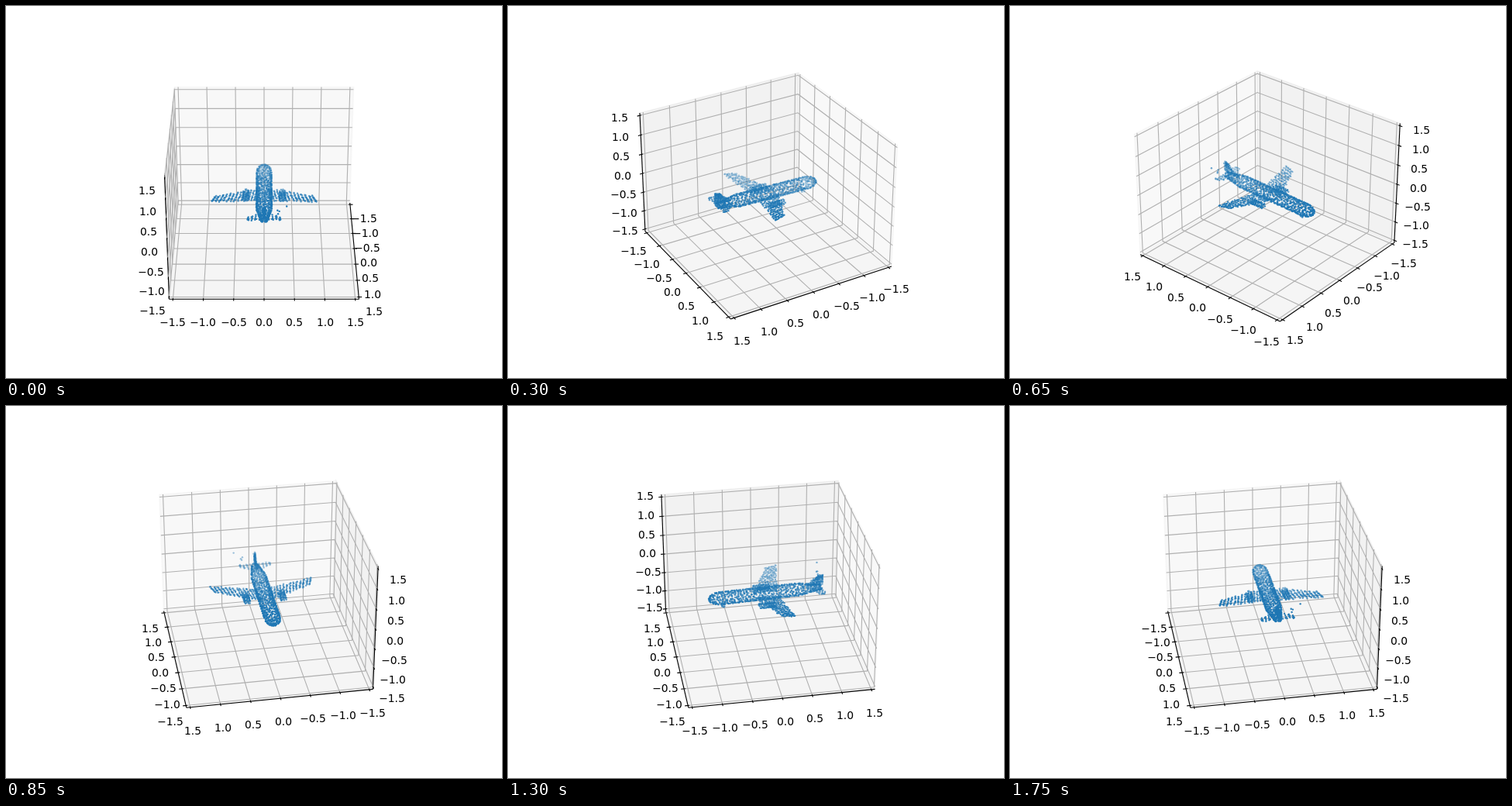
Write an HTML page with a canvas that moves like this. It is 640 by 480 pixels and loops after 1.8 s.

```html
<!DOCTYPE html>
<html>
<head>
<meta charset="utf-8">
<style>
html, body { margin: 0; width: 100%; height: 100%; overflow: hidden; background: #fff; }
canvas { display: block; }
</style>
</head>
<body>
<canvas id="stage" width="640" height="480"></canvas>
<script>
const ctx = document.getElementById('stage').getContext('2d');
const EDGE = 1.5625, LABEL_GAP = 0.2593;
const TICKS = [-1.5, -1, -0.5, 0, 0.5, 1, 1.5];
const PANES = ['rgba(242,242,242,.5)', 'rgba(230,230,230,.5)', 'rgba(236,236,236,.5)'];
const TICK_DIR = [1, 0, 0];
const SIN_ELEV = 0.5, COS_ELEV = Math.sqrt(3) / 2;

let seed = 7;
const rand = () => (seed = (seed * 16807) % 2147483647) / 2147483647;
const mix = (a, b, t) => a + (b - a) * t;

// Evenly spread pairs in the unit square, slightly jittered
function scatter(n, place) {
  for (let i = 0; i < n; i++) {
    const u = (i * 0.7548777 + rand() * 0.02) % 1;
    const v = (i * 0.5698403 + rand() * 0.04) % 1;
    points.push(place(u, v));
  }
}

const points = [];
function tube(n, x0, x1, y, z, radius) {
  scatter(n, (u, v) => {
    const x = mix(x0, x1, u), r = radius(x), a = v * 2 * Math.PI;
    return [x, y + r * Math.cos(a), z(x) + r * Math.sin(a)];
  });
}

function buildPlane() {
  tube(720, -0.98, 0.96, 0, x => -0.08 + 0.04 * x, x => {
    if (x < -0.78) return 0.13 * Math.sqrt(1 - ((x + 0.78) / 0.202) ** 2);
    return x < 0.55 ? 0.13 : mix(0.13, 0.05, (x - 0.55) / 0.41);
  });
  for (const side of [-1, 1]) {
    scatter(150, (u, v) => {
      const s = u ** 1.15;
      return [mix(mix(-0.2, 0.15, s), mix(0.2, 0.34, s), v),
        side * mix(0.08, 0.88, s), mix(-0.12, -0.05, s) + (rand() - 0.5) * 0.03];
    });
    tube(55, -0.17, 0.12, side * 0.31, () => -0.16, () => 0.05);
    scatter(20, (u, v) => [mix(mix(0.75, 0.88, u), 0.98, v), side * mix(0.06, 0.31, u), -0.02]);
  }
  scatter(75, (u, v) => [mix(mix(0.7, 0.9, u), 0.98, v), (rand() - 0.5) * 0.03, mix(0, 0.27, u)]);
  scatter(9, (u, v) => [mix(-0.76, -0.68, u), mix(-0.05, 0.05, v), mix(-0.33, -0.22, rand())]);
  points.push([0.95, 0.37, 0.32], [0.92, 0.25, 0.17], [0.94, 0.23, 0.12], [0.93, 0.22, 0.2]);
}

function draw(azim) {
  const c = Math.cos(azim), s = Math.sin(azim);
  const project = ([x, y, z]) => {
    const wx = x * 8 / 21, wy = y * 8 / 21, wz = z * 2 / 7;
    const toward = wx * c + wy * s;
    const depth = 10 - toward * COS_ELEV - wz * SIN_ELEV;
    const k = 1997.84 / depth;
    return [333 + (wy * c - wx * s) * k, 237.4 - (wz * COS_ELEV - toward * SIN_ELEV) * k, depth];
  };
  const path = (...corners) => {
    ctx.beginPath();
    for (const p of corners) {
      const [x, y] = project(p);
      ctx.lineTo(x, y);
    }
  };
  const line = (color, ...corners) => {
    ctx.strokeStyle = color;
    ctx.lineWidth = 1.11;
    path(...corners);
    ctx.stroke();
  };
  const put = (p, i, value) => { const q = [...p]; q[i] = value; return q; };
  const flip = (p, i) => put(p, i, -p[i]);

  ctx.globalAlpha = 1;
  ctx.fillStyle = '#fff';
  ctx.fillRect(0, 0, 640, 480);

  const far = [c < -1e-9 ? EDGE : -EDGE, s < -1e-9 ? EDGE : -EDGE, -EDGE];
  for (let i = 0; i < 3; i++) {
    const a = (i + 1) % 3, b = (i + 2) % 3;
    ctx.fillStyle = ctx.strokeStyle = PANES[i];
    ctx.lineWidth = 1.39;
    path(far, flip(far, a), flip(flip(far, a), b), flip(far, b));
    ctx.fill();
    ctx.stroke();
  }

  ctx.font = '13.89px "DejaVu Sans", sans-serif';
  ctx.textAlign = 'center';
  for (let i = 0; i < 3; i++) {
    const dir = TICK_DIR[i], edge = flip(far, dir);
    line('#000', edge, flip(edge, i));
    for (const t of TICKS) {
      const corner = put(far, i, t);
      line('#b0b0b0', flip(corner, (i + 1) % 3), corner, flip(corner, (i + 2) % 3));
    }
    for (const t of TICKS) {
      const at = put(edge, i, t), out = Math.sign(at[dir]);
      line('#000', put(at, dir, at[dir] - 0.025 * out), put(at, dir, at[dir] + 0.05 * out));
      const [x, y] = project(at.map((v, j) => j === i ? v : v + LABEL_GAP * Math.sign(v)));
      ctx.fillStyle = '#000';
      ctx.fillText(t.toFixed(1).replace('-', '\u2212'), Math.round(x), Math.round(y) + 11);
    }
  }

  const dots = points.map(project).sort((a, b) => b[2] - a[2]);
  const back = dots[0][2], front = dots[dots.length - 1][2];
  ctx.fillStyle = '#1f77b4';
  for (const [x, y, depth] of dots) {
    ctx.globalAlpha = 1 - 0.65 * (depth - front) / (back - front);
    ctx.beginPath();
    ctx.arc(x, y, 1.2, 0, 2 * Math.PI);
    ctx.fill();
  }
}

buildPlane();
const start = performance.now();
function tick() {
  const step = Math.floor((performance.now() - start) / 50) % 36;
  draw(step * Math.PI / 18);
  requestAnimationFrame(tick);
}
tick();
</script>
</body>
</html>
```
